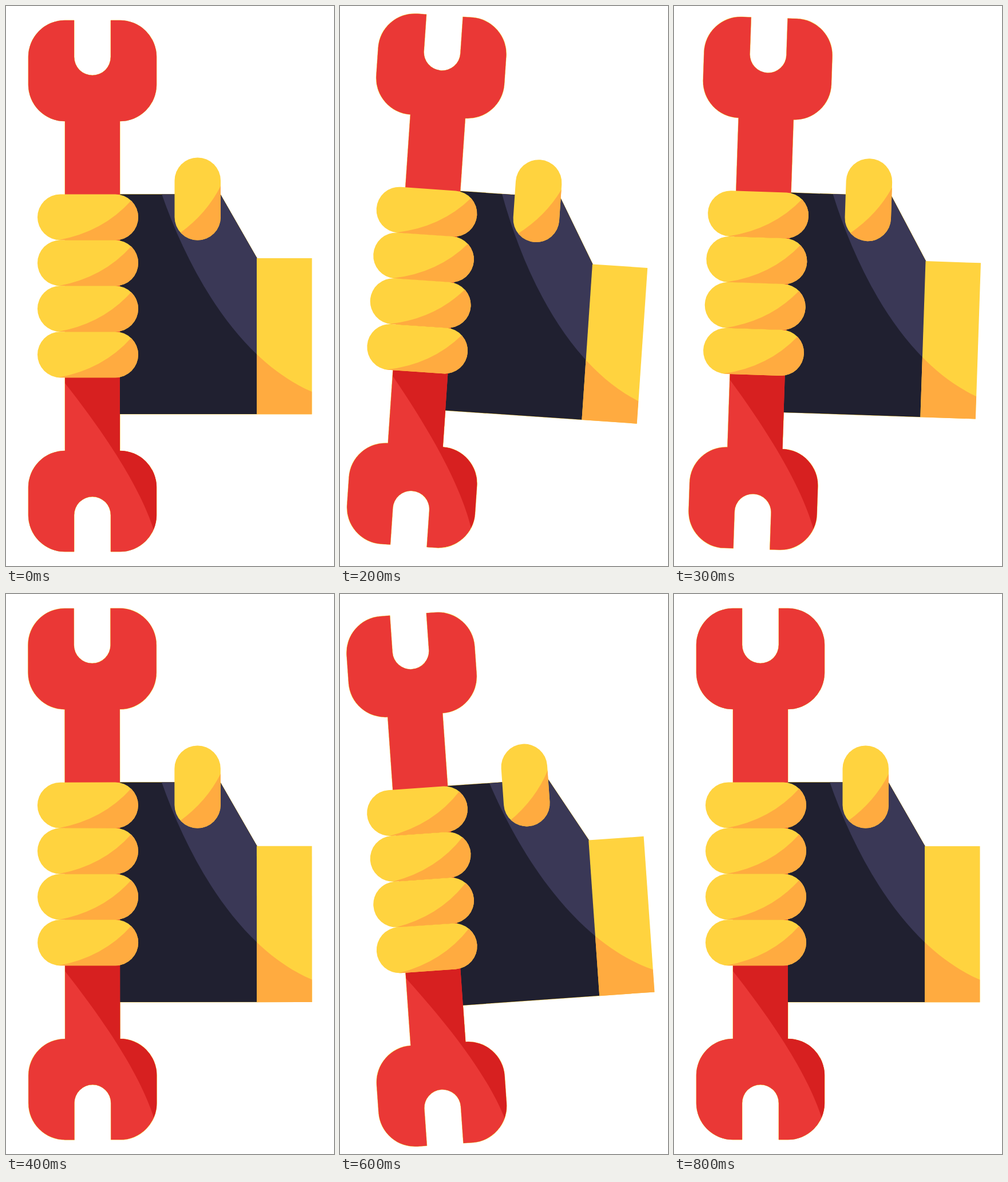
An HTML page for the animation above (850 ms loop, 573 px wide and 977 px high).

```html
<!DOCTYPE html>
<html lang="en">
<head>
<meta charset="utf-8">
<title>Hand with wrench</title>
<style>
  html, body { margin: 0; width: 100%; height: 100%; overflow: hidden; background: #fff; }
  svg { display: block; width: 573px; height: 977px; }
  .halo { stroke: #ffd33f; stroke-width: 1; }
  .yellow { fill: #ffd33f; }
  .orange { fill: #ffab40; }
</style>
</head>
<body>
<svg viewBox="0 0 573 977">
  <defs>
    <path id="wrench" d="M119 25H103A64 64 0 0 0 39 89V137A64 64 0 0 0 103 201V776A64 64 0 0 0 39 840V888A64 64 0 0 0 103 952H119V888A32 32 0 0 1 183 888V952H199A64 64 0 0 0 263 888V840A64 64 0 0 0 199 776V201A64 64 0 0 0 263 137V89A64 64 0 0 0 199 25H183V89A32 32 0 0 1 119 89Z"/>
    <path id="glove" d="M190 328.5H374.5L438.5 440V712H190Z"/>
    <rect id="cuff" x="438" y="440" width="96.5" height="272.3"/>
    <rect id="pill" x="55" y="328.5" width="176" height="80" rx="40"/>
    <rect id="thumb" x="294.5" y="264.5" width="80.5" height="144" rx="40.2"/>
    <path id="sweep" d="M272 328C318 460 404 617 534.5 673"/>
    <clipPath id="inWrench"><use href="#wrench"/></clipPath>
    <clipPath id="inGlove"><use href="#glove"/></clipPath>
    <clipPath id="inCuff"><use href="#cuff"/></clipPath>
    <clipPath id="inPill"><use href="#pill"/></clipPath>
    <clipPath id="inThumb"><use href="#thumb"/></clipPath>
    <g id="finger">
      <use href="#pill" class="yellow"/>
      <path class="orange" clip-path="url(#inPill)" d="M91 408.5Q170 394 219 339L240 330V412H91Z"/>
    </g>
  </defs>
  <g id="hand">
    <g class="halo">
      <use href="#wrench"/>
      <use href="#glove"/>
    </g>
    <use href="#glove" fill="#202030"/>
    <path fill="#3a3856" clip-path="url(#inGlove)" d="M272 328C318 460 404 617 534.5 673V328Z"/>
    <use href="#cuff" class="yellow"/>
    <path class="orange" clip-path="url(#inCuff)" d="M272 328C318 460 404 617 534.5 673V713H272Z"/>
    <use href="#wrench" fill="#ea3836"/>
    <path fill="#d72020" clip-path="url(#inWrench)" d="M103 640V658C185 762 237 848 258 914L270 920V640Z"/>
    <use href="#finger"/>
    <use href="#finger" y="79.9"/>
    <use href="#finger" y="159.8"/>
    <use href="#finger" y="239.7"/>
    <use href="#thumb" class="yellow"/>
    <path class="orange" clip-path="url(#inThumb)" d="M304 396Q351 362 375.5 313V410H304Z"/>
  </g>
</svg>
<script>
  const hand = document.getElementById('hand');
  const STEP = 50, STEPS = 17;
  const KEYS = [[0, 0], [4, 3.9], [12, -4], [16, 0]]; // [step, degrees]

  function angleAt(step) {
    const i = KEYS.findIndex(([s], k) => k > 0 && step <= s);
    const [s0, a0] = KEYS[i - 1], [s1, a1] = KEYS[i];
    return a0 + (a1 - a0) * (step - s0) / (s1 - s0);
  }

  function draw() {
    const step = Math.floor(performance.now() / STEP) % STEPS;
    hand.setAttribute('transform', `rotate(${angleAt(step)} 286.5 488.5)`);
    requestAnimationFrame(draw);
  }
  draw();
</script>
</body>
</html>
```
